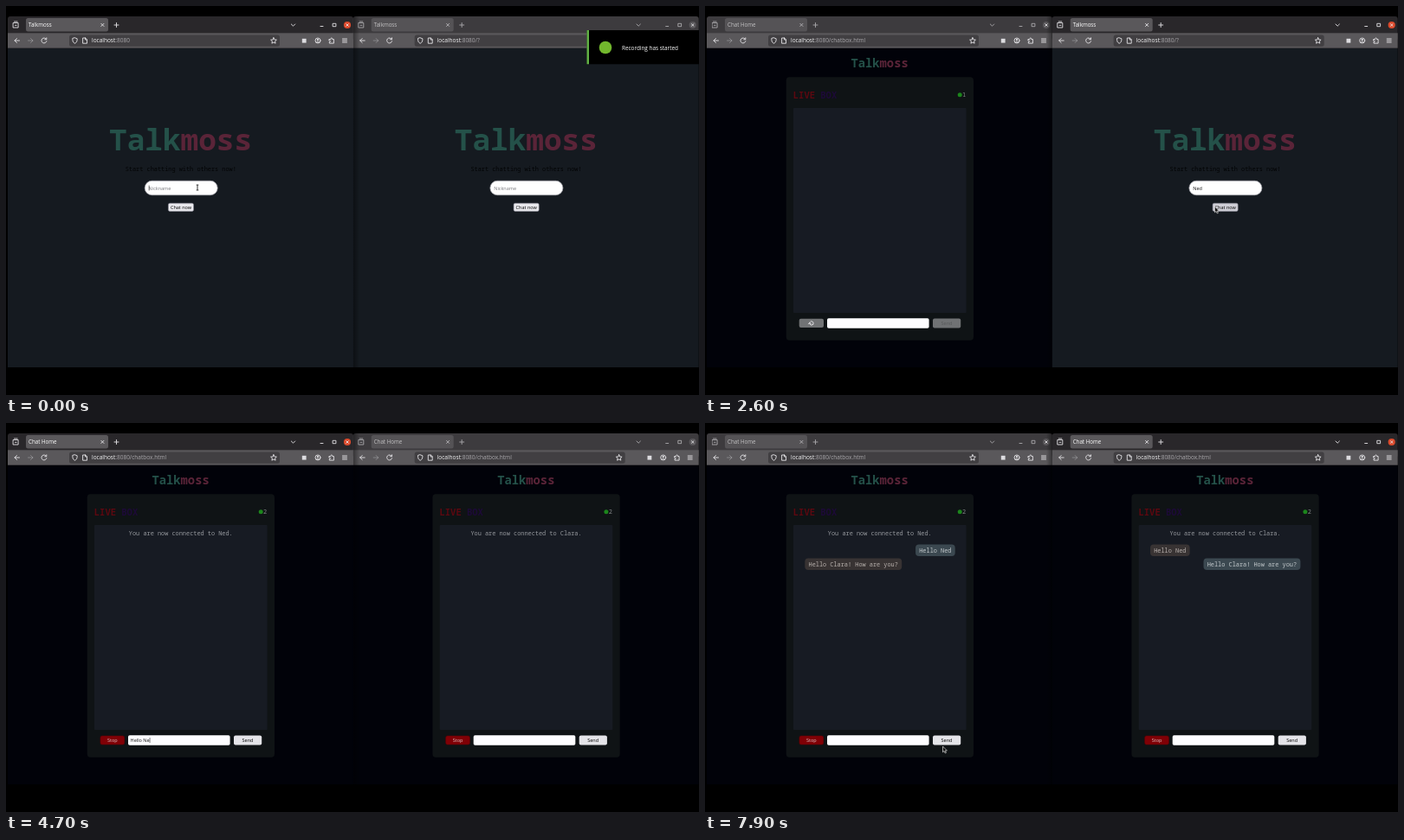
These frames come from a looping animation (800 px wide and 450 px high, 8 s). An HTML page:

```html
<!DOCTYPE html>
<html lang="en">
<head>
<meta charset="utf-8">
<title>Talkmoss chat demo</title>
<style>
  html, body { margin: 0; width: 100%; height: 100%; overflow: hidden; background: #000; }
  svg { display: block; width: 100vw; height: 100vh; }
  text { font-family: "Open Sans", "Noto Sans", sans-serif; white-space: pre; }
  .mono { font-family: "Noto Sans Mono", "DejaVu Sans Mono", monospace; }
  .bold { font-weight: 700; }
  .mid { text-anchor: middle; }
  .icon { fill: none; stroke: #e6e5e8; stroke-width: .9; stroke-linecap: round; stroke-linejoin: round; }
</style>
</head>
<body>
<svg id="stage" viewBox="0 0 800 450">
  <defs>
    <linearGradient id="shadeRight"><stop stop-opacity=".4"/><stop offset="1" stop-opacity="0"/></linearGradient>
    <linearGradient id="shadeLeft"><stop stop-opacity="0"/><stop offset="1" stop-opacity=".4"/></linearGradient>
  </defs>
</svg>
<script>
const LOOP = 8000;
const APP = ['Talk', 'moss'];
const USERS = ['Clara', 'Ned'];
const GREETING = `Hello ${USERS[1]}`;
const REPLY = `Hello ${USERS[0]}! How are you?`;

// [time, letters typed]
const KEYS = {
  firstName: [[100, 0], [550, 5]],
  secondName: [[2000, 0], [2300, 3]],
  greeting: [[4200, 0], [4750, 9]],
  reply: [[5560, 0], [5900, 5], [6800, 16], [7300, 25]]
};
const AT = { firstHome: 800, secondHome: 2700, connected: 2900, greeting: 4900, reply: 7600 };
// [time, focused window]
const FOCUS = [[0, 0], [1900, 1], [4000, 0], [5400, 1]];
// [start, end, x, y, x2, y2, shape]
const CURSOR = [
  [0, 150, 221, 210, 221, 210, 'beam'],
  [900, 1450, 221, 207.5, 221, 207.5, 'arrow'],
  [1450, 1800, 221, 207.5, 648, 214, 'arrow'],
  [1800, 2050, 648, 211, 612, 211, 'beam'],
  [2320, 2500, 612, 212, 588.5, 232, 'arrow'],
  [2500, 3300, 588.5, 232, 588.5, 232, 'arrow'],
  [3300, 3700, 588.5, 232, 238, 366, 'arrow'],
  [3700, 4230, 238, 369.5, 238, 369.5, 'beam'],
  [5050, 5350, 238, 366, 613, 366, 'arrow'],
  [5350, 5600, 613, 368, 613, 368, 'beam'],
  [7900, 8000, 274.5, 374, 274.5, 374, 'arrow']
];

const stage = document.getElementById('stage');
function add(parent, tag, attrs = {}, text) {
  const el = document.createElementNS('http://www.w3.org/2000/svg', tag);
  for (const key in attrs) el.setAttribute(key, attrs[key]);
  if (text !== undefined) el.textContent = text;
  parent.appendChild(el);
  return el;
}
const group = (parent, attrs) => add(parent, 'g', attrs);
const rect = (parent, x, y, x2, y2, fill, rx = 0, more = {}) =>
  add(parent, 'rect', { x, y, width: x2 - x, height: y2 - y, fill, rx, ...more });
const circle = (parent, cx, cy, r, fill, more = {}) => add(parent, 'circle', { cx, cy, r, fill, ...more });
const label = (parent, x, y, size, fill, text, cls = '') =>
  add(parent, 'text', { x, y, 'font-size': size, fill, class: cls }, text);
const icon = (parent, d, more = {}) => add(parent, 'path', { d, class: 'icon', ...more });
const show = (el, on) => { el.style.display = on ? '' : 'none'; };
const setText = (el, text) => { if (el.textContent !== text) el.textContent = text; };

function brand(parent, y, size) {
  const el = label(parent, 201.6, y, size, '#245149', '', 'mono bold mid');
  add(el, 'tspan', {}, APP[0]);
  add(el, 'tspan', { fill: '#5a2438' }, APP[1]);
}

function makeField(parent, x, y) {
  const text = label(parent, x, y, 5.5, '#111', '');
  const caret = rect(parent, 0, y - 5, .6, y + 1, '#222');
  return (value, caretOn) => {
    setText(text, value);
    show(caret, caretOn);
    if (caretOn) caret.setAttribute('x', x + text.getComputedTextLength() + .2);
  };
}

function makeChrome(win) {
  const strip = rect(win, 2, 12, 401, 40, '#29272a', 3);
  const tab = rect(win, 23, 14, 118, 29.5, '#5a585b', 2.5);
  const bar = group(win);
  icon(bar, 'M8.5 19.5h5.6v5.5h-5.6zM9.5 18h3.6M10.4 22.3h1.8');
  const title = label(bar, 26, 24.2, 6.2, '#fff', '');
  icon(bar, 'M109.8 20.3l3.2 3.2m0-3.2l-3.2 3.2', { 'stroke-width': .7 });
  icon(bar, 'M125 22h5M127.5 19.5v5M329.3 21l2.2 2.2 2.2-2.2');
  icon(bar, 'M363 23.5h3M377.5 20.3h3.4v3.4h-3.4z');
  const close = circle(win, 394, 22, 4.1, '#dc4a2c');
  icon(win, 'M392.7 20.7l2.6 2.6m0-2.6l-2.6 2.6', { 'stroke-width': .8 });

  rect(win, 2, 31.3, 401, 48.7, '#5a585b');
  rect(win, 73, 33.5, 316, 46.8, '#413f42', 2.5);
  icon(win, 'M15.5 40h-5.5m2.5-2.5l-2.5 2.5 2.5 2.5');
  icon(win, 'M25.5 40h5.5m-2.5-2.5l2.5 2.5-2.5 2.5', { opacity: .35 });
  icon(win, 'M46.5 38.3a3 3 0 1 0 .4 2.4M46.8 36.8v1.9h-1.9');
  icon(win, 'M79.5 36.8l2.7 1c0 3-.5 4.3-2.7 5.5-2.2-1.2-2.7-2.5-2.7-5.5z', { 'stroke-width': .8 });
  icon(win, 'M89 37h2.7l1.8 1.8v4.4h-4.5zM91.5 37v2h2', { 'stroke-width': .8 });
  icon(win, 'M309 36.7l1 2.2 2.4.3-1.8 1.6.5 2.4-2.1-1.2-2.1 1.2.5-2.4-1.8-1.6 2.4-.3z', { 'stroke-width': .8 });
  rect(win, 341.8, 37.8, 346.6, 42.6, '#dddce0');
  circle(win, 360, 40, 3, 'none', { class: 'icon' });
  circle(win, 360, 39.2, 1.1, '#e6e5e8');
  icon(win, 'M358.2 42.1q1.8-1.7 3.6 0');
  icon(win, 'M373.3 38.5h1.6c-.5-2 2.4-2 1.9 0h1.6v4.6h-5.1v-1.6c1.8.4 1.8-1.9 0-1.5z');
  icon(win, 'M388.5 38h5M388.5 40h5M388.5 42h5');
  const url = label(win, 99, 42.3, 6.5, '#f4f4f5', 'localhost');
  const path = add(url, 'tspan', { fill: '#aaa8ac' });

  return (focused, tabTitle, urlPath) => {
    strip.setAttribute('fill', focused ? '#29272a' : '#3d3b3e');
    tab.setAttribute('fill', focused ? '#5a585b' : '#555356');
    bar.setAttribute('opacity', focused ? 1 : .65);
    close.setAttribute('fill', focused ? '#dc4a2c' : '#59575a');
    setText(title, tabTitle);
    setText(path, urlPath);
  };
}

function makeHome(win) {
  const page = group(win);
  rect(page, 2, 48.7, 401, 418, '#151a20');
  brand(page, 167, 34.4);
  label(page, 201.8, 190.6, 6.9, '#030405', 'Start chatting with others now!', 'mono mid');
  rect(page, 160.2, 202.3, 244.2, 218.7, '#fff', 8.2, { stroke: '#a9a9b0', 'stroke-width': .7 });
  const hint = label(page, 164.6, 212.5, 5.5, '#77777b', 'Nickname');
  const field = makeField(page, 164.6, 212.5);
  const button = rect(page, 187.4, 228.2, 216.5, 237.4, '#e9e9ed', 1.6, { stroke: '#8f8f9d', 'stroke-width': .5 });
  label(page, 202, 234.9, 5.5, '#000', 'Chat now', 'mid');
  return { page, update(value, caretOn, hover) {
    show(hint, !value);
    field(value, caretOn);
    button.setAttribute('fill', hover ? '#cfcfd6' : '#e9e9ed');
  } };
}

function makeBubble(parent, y, text, own) {
  const el = group(parent);
  const width = text.length * 4.14 + 8.4;
  const x = own ? 288.7 - width : 115.3;
  rect(el, x, y, x + width, y + 13.6, own ? '#3b4850' : '#383333', 4);
  label(el, x + 4.2, y + 9.2, 6.9, own ? '#c4cacd' : '#b9b2ae', text, 'mono');
  return el;
}

function makeChat(win, index) {
  const page = group(win);
  rect(page, 2, 48.7, 401, 418, '#010209');
  brand(page, 71, 13.8);
  rect(page, 93.7, 82.3, 310, 386.7, '#0f1315', 4);
  const live = label(page, 101.8, 106.5, 10.5, '#5c0810', 'LIVE ', 'mono bold');
  add(live, 'tspan', { fill: '#1d0a38' }, 'BOX');
  circle(page, 294.2, 102.8, 2.5, '#1c861c');
  const count = label(page, 297, 105.4, 7, '#85888a', '1', 'mono');
  rect(page, 102, 118, 301.6, 355, '#171b23', 1);
  rect(page, 141, 361.2, 258.6, 372.7, '#fdfdff', 1.8);
  const field = makeField(page, 143.6, 369);

  const waiting = group(page);
  rect(waiting, 108.7, 361.7, 137, 372, '#717375', 2);
  const spinner = icon(waiting, 'M125.1 366a2.2 2.2 0 1 0 0 2M125.3 364.3v1.9h-1.9', { 'stroke-width': .8 });
  rect(waiting, 263, 361.5, 295.2, 372.5, '#707274', 2);
  label(waiting, 279, 369, 5.5, '#565859', 'Send', 'mid');

  const joined = group(page);
  rect(joined, 108.9, 361.9, 136.8, 372, '#800006', 2, { stroke: '#5c0005', 'stroke-width': .6 });
  label(joined, 122.8, 369, 5.5, '#ddc5c6', 'Stop', 'mid');
  rect(joined, 263, 361.5, 295.2, 372.5, '#e4e4e8', 2);
  label(joined, 279, 369, 5.5, '#000', 'Send', 'mid');
  label(joined, 201.8, 129.7, 6.9, '#96999e', `You are now connected to ${USERS[1 - index]}.`, 'mono mid');
  const greeting = makeBubble(joined, 140.5, GREETING, index === 0);
  const reply = makeBubble(joined, 156.5, REPLY, index === 1);

  return { page, update(t, value, caretOn) {
    const connected = t >= AT.connected;
    show(waiting, !connected);
    show(joined, connected);
    show(greeting, t >= AT.greeting);
    show(reply, t >= AT.reply);
    setText(count, connected ? '2' : '1');
    spinner.setAttribute('transform', `rotate(${t * .36} 123 367)`);
    field(value, caretOn);
  } };
}

function makeWindow(index) {
  const win = group(stage, { transform: `translate(${index * 398.7} 0)` });
  const home = makeHome(win), chat = makeChat(win, index), chrome = makeChrome(win);
  const enteredAt = index ? AT.secondHome : AT.firstHome;
  return (t, focused, name, message, caretOn, hover) => {
    const inChat = t >= enteredAt;
    show(home.page, !inChat);
    show(chat.page, inChat);
    chrome(focused, inChat ? 'Chat Home' : APP.join(''), inChat ? ':8080/chatbox.html' : index ? ':8080/?' : ':8080');
    if (inChat) chat.update(t, message, caretOn);
    else home.update(name, caretOn, hover);
  };
}

const windows = [makeWindow(0), makeWindow(1)];
const shades = [
  rect(stage, 401, 12, 408, 418, 'url(#shadeRight)'),
  rect(stage, 394, 12, 401, 418, 'url(#shadeLeft)')
];

const toast = group(stage);
rect(toast, 670.5, 28, 800, 67.3, '#000');
rect(toast, 670.5, 28, 673, 67.3, '#62b146');
circle(toast, 692, 48, 7.3, '#72b72d');
label(toast, 711, 50.6, 6.4, '#fff', 'Recording has started');

const pointers = {
  arrow: add(stage, 'path', { d: 'M0 0v6.8l1.6-1.4 1.1 2.5 1.2-.5-1.1-2.4h2.1z', fill: '#111', stroke: '#ddd', 'stroke-width': .7 }),
  beam: add(stage, 'path', { d: 'M-1.3-3h2.6M0-3v6M-1.3 3h2.6', fill: 'none', stroke: '#222', 'stroke-width': .9 })
};

function typed(text, keys, t) {
  let count = 0;
  keys.forEach(([time, n], i) => {
    if (t < time) return;
    const next = keys[i + 1];
    count = next ? n + (next[1] - n) * Math.min(1, (t - time) / (next[0] - time)) : n;
  });
  return text.slice(0, Math.floor(count + 1e-6));
}

function drawCursor(t) {
  const step = CURSOR.find(([from, to]) => t >= from && t < to);
  for (const name in pointers) show(pointers[name], step && step[6] === name);
  if (!step) return;
  const [from, to, x, y, x2, y2, shape] = step;
  const p = (t - from) / (to - from), k = p * p * (3 - 2 * p);
  pointers[shape].setAttribute('transform', `translate(${x + (x2 - x) * k} ${y + (y2 - y) * k})`);
}

function render(t) {
  const focus = FOCUS.filter(([time]) => t >= time).pop()[1];
  const within = (from, to) => t >= from && t < to;
  const greeting = t < AT.greeting ? typed(GREETING, KEYS.greeting, t) : '';
  const reply = t < AT.reply ? typed(REPLY, KEYS.reply, t) : '';
  const leftCaret = within(0, 560) || within(4000, 5300);
  const rightCaret = within(1950, 2320) || within(5400, 7900);
  windows[0](t, focus === 0, typed(USERS[0], KEYS.firstName, t), greeting, leftCaret, false);
  windows[1](t, focus === 1, typed(USERS[1], KEYS.secondName, t), reply, rightCaret, within(2450, 2700));
  shades.forEach((shade, i) => show(shade, i === focus));
  const out = Math.min(1, Math.max(0, (t - 100) / 300));
  show(toast, out < 1);
  toast.setAttribute('transform', `translate(${130 * out * out} 0)`);
  drawCursor(t);
}

const start = performance.now();
function tick() {
  render((performance.now() - start) % LOOP);
  requestAnimationFrame(tick);
}
tick();
</script>
</body>
</html>
```
